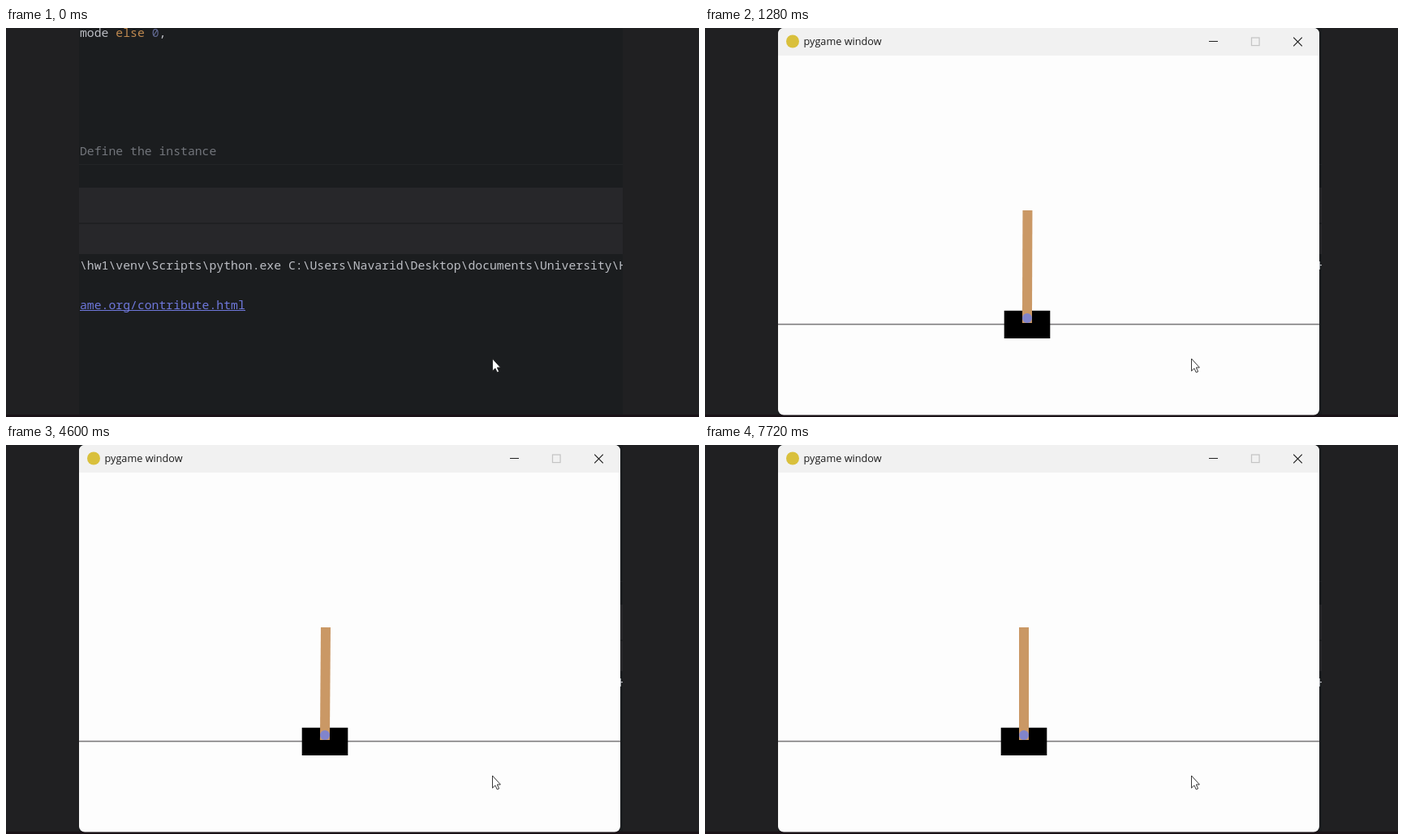
Write an HTML page that moves like this. It is 854x480 px and loops after 8000 ms.

```html
<!DOCTYPE html>
<html lang="en">
<head>
<meta charset="utf-8">
<title>Cart and pole</title>
<style>
  html, body { margin: 0; width: 100%; height: 100%; overflow: hidden; background: #202022; }
  svg { display: block; width: 100vw; height: 100vh; }
  .code { font: 14.77px "Noto Sans Mono", "DejaVu Sans Mono", monospace; fill: #bcbec4; white-space: pre; }
  .title { font: 12.7px "Open Sans", "Noto Sans", sans-serif; fill: #1c1c1c; }
  .window, .cart, .pole { animation: 8s linear infinite; }
  .window { transform-origin: 283.5px 160px; animation-name: open; }
  .cart { animation-name: drive; }
  .pole { transform-origin: 411px 358px; animation-name: tilt; shape-rendering: crispEdges; }

  @keyframes open {
    0%, 0.499% { opacity: 0; transform: scale(.91); }
    0.5% { opacity: .42; transform: scale(.915); }
    1% { opacity: .82; transform: scale(.943); }
    1.5% { opacity: .97; transform: scale(.966); }
    2% { opacity: 1; transform: scale(.982); }
    2.5% { transform: scale(.992); }
    3.5%, 100% { opacity: 1; transform: none; }
  }
  @keyframes drive {
    0%, 1% { transform: translateX(6.6px); }
    4% { transform: translateX(3.2px); }
    7% { transform: translateX(0); }
    11% { transform: translateX(-6px); }
    16% { transform: translateX(-14px); }
    20% { transform: translateX(-18.6px); }
    23% { transform: translateX(-19.6px); }
    28%, 40% { transform: translateX(-19px); }
    45% { transform: translateX(-19.4px); }
    50% { transform: translateX(-18.6px); }
    55%, 57.5% { transform: translateX(-18px); }
    60%, 67% { transform: translateX(-18.5px); }
    69%, 77.5% { transform: translateX(-18.2px); }
    81.5%, 100% { transform: translateX(-18px); }
  }
  @keyframes tilt {
    0%, 1% { transform: rotate(-2.2deg); }
    4% { transform: rotate(-1.2deg); }
    7% { transform: rotate(-.45deg); }
    12% { transform: rotate(-.2deg); }
    18% { transform: rotate(.4deg); }
    23% { transform: rotate(.3deg); }
    28%, 40% { transform: rotate(0deg); }
    45% { transform: rotate(-.3deg); }
    50% { transform: rotate(0deg); }
    55%, 58% { transform: rotate(.42deg); }
    60%, 61% { transform: rotate(.2deg); }
    62%, 63.5% { transform: rotate(0deg); }
    64%, 67% { transform: rotate(.2deg); }
    69%, 77.5% { transform: rotate(.25deg); }
    81.5%, 86% { transform: rotate(0deg); }
    88%, 91% { transform: rotate(.2deg); }
    91.5%, 93.5% { transform: rotate(0deg); }
    94%, 96% { transform: rotate(.2deg); }
    96.5%, 100% { transform: rotate(0deg); }
  }
</style>
</head>
<body>
<svg viewBox="0 0 854 480" preserveAspectRatio="none">
  <defs><clipPath id="pane"><rect x="90" width="670" height="480"/></clipPath></defs>
  <rect width="854" height="480" fill="#202022"/>

  <g clip-path="url(#pane)">
    <rect x="90" width="670" height="480" fill="#1b1d1f"/>
    <rect x="90" y="168" width="670" height="1" fill="#222427"/>
    <rect x="90" y="197" width="670" height="82" fill="#27272a"/>
    <rect x="90" y="240.5" width="670" height="1.2" fill="#1b1c1e"/>
    <g class="code">
      <text x="91" y="10.5">mode <tspan fill="#c08a50">else</tspan> <tspan fill="#626a94">0</tspan>,</text>
      <text x="91" y="157" fill="#72757b">Define the instance</text>
      <text x="91" y="298">\hw1\venv\Scripts\python.exe C:\Users\Navarid\Desktop\documents\University\H</text>
      <text x="91" y="347" fill="#6f78dc">ame.org/contribute.html</text>
    </g>
    <rect x="91" y="348" width="204" height="1" fill="#6f78dc"/>
  </g>
  <rect y="477" width="854" height="3" fill="#1a1217"/>

  <g class="window">
    <rect x="90" y="0" width="667" height="477.5" rx="7" fill="#fdfdfd"/>
    <path d="M90 34V7a7 7 0 0 1 7-7h653a7 7 0 0 1 7 7v27z" fill="#f1f1f1"/>
    <circle cx="108" cy="16.5" r="8" fill="#d9c03c"/>
    <text class="title" x="121.5" y="21">pygame window</text>
    <g fill="none" stroke="#222" stroke-width="1.2">
      <path d="M621 16.5h11M725.2 11.7l10.6 10.6M735.8 11.7l-10.6 10.6"/>
      <rect x="673.5" y="12" width="9.6" height="9.6" stroke="#c4c4c4"/>
    </g>
    <rect x="90" y="364.8" width="667" height="1.6" fill="#7c7a7c"/>
    <g class="cart">
      <rect x="382.7" y="348.8" width="56.6" height="34.2"/>
      <rect class="pole" x="405" y="224.5" width="12" height="139.5" fill="#ca9865"/>
      <circle cx="411" cy="358" r="6" fill="#8184cb"/>
    </g>
  </g>

  <path d="M599.5 408v15.2l3.4-3.2 2.4 5 2.3-1-2.3-5h4.1z" fill="#fff" stroke="#222" stroke-width=".9" stroke-linejoin="round"/>
</svg>
</body>
</html>
```
